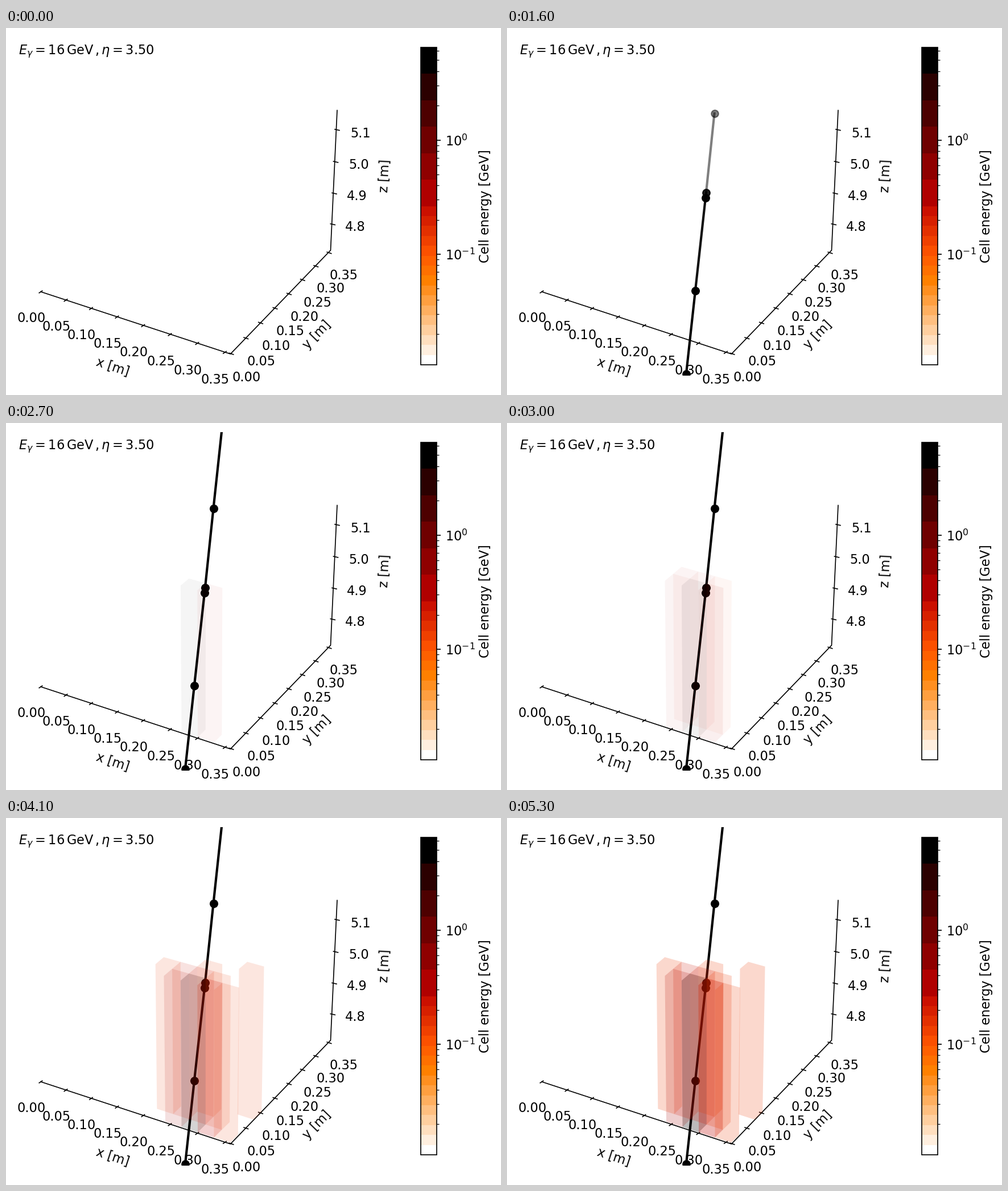
Animation of 870x644 px, one loop 6.3 s. Source, as a matplotlib script:

```python
import matplotlib.pyplot as plt
import numpy as np
from matplotlib.animation import FuncAnimation
from matplotlib.patches import Polygon, Rectangle

W, H, DPI = 870, 644, 64
STEP, FRAMES = 100, 63
PT = 72 / DPI  # points per pixel
FONT = 22.5 * PT
THIN = 1.67 * PT

plt.rcParams["font.family"] = "DejaVu Sans"
plt.rcParams["mathtext.fontset"] = "dejavusans"

fig = plt.figure(figsize=(W / DPI, H / DPI), dpi=DPI, facecolor="white")
ax = fig.add_axes([0, 0, 1, 1])
ax.set_xlim(0, W)
ax.set_ylim(H, 0)
ax.axis("off")


def stroke(x, y, width=THIN, **kw):
    return ax.plot(x, y, color="black", lw=width, **kw)[0]


def label(x, y, text, **kw):
    kw = {"ha": "center", "va": "baseline", "fontsize": FONT, **kw}
    ax.text(x, y, text, **kw)


def tick_axis(ticks, texts, values, half, fmt):
    """Ticks as short strokes, each with its number centred on a point."""
    dx, dy = half
    for (x, y), (tx, ty), v in zip(ticks, texts, values):
        stroke([x - dx, x + dx], [y - dy, y + dy], solid_capstyle="butt")
        label(tx, ty + 8.2, format(v, fmt))


def draw_axes():
    stroke([61, 394.5, 570.5, 582], [462.8, 572, 390, 144.5])
    steps = np.arange(8) * 0.05
    tick_axis(
        [(61, 463), (105, 477.7), (149.5, 492.3), (195, 507.2),
         (241, 522.3), (288, 538), (336, 553.5), (384.5, 569.3)],
        [(44.5, 507.5), (88.5, 522.5), (133, 538), (179, 552.5),
         (225, 568), (272.5, 583.5), (320, 599.5), (368, 616)],
        steps, (3.4, -2.3), ".2f")
    tick_axis(
        [(396, 571.7), (421.8, 544.3), (447.5, 517.6), (473, 491.8),
         (497.5, 466.7), (521.3, 442), (544.8, 418), (568, 394.5)],
        [(423, 612), (449, 584), (475, 557), (499.5, 530.8),
         (524.5, 505.5), (548, 480.3), (571, 455.8), (593.5, 432.3)],
        steps, (4.5, 1.5), ".2f")
    tick_axis(
        [(574.3, 344.5), (577, 290.3), (579.5, 235), (582, 178.7)],
        [(614, 348.2), (616.8, 293.7), (619.8, 239), (622.8, 183.5)],
        4.8 + np.arange(4) * 0.1, (4.8, 1.1), ".1f")
    for x, y, name, angle in [(187, 595, "x", -18.1), (547, 539, "y", 45.9),
                              (666, 259, "z", 87.3)]:
        label(x, y, f"{name} [m]", rotation=angle, va="center",
              rotation_mode="anchor")


def draw_colorbar(left=728.5, right=757, top=34, bottom=591):
    def band(y0, y1, color):
        ax.add_patch(Rectangle((left, y0), right - left, y1 - y0, lw=0,
                               color=color, antialiased=False))

    middle = (top + bottom) / 2
    fine, coarse = (bottom - middle) / 16, (middle - top) / 6
    for k in range(16):
        x = 1 - k / 32
        heat = np.clip([1.5 * x, 2 * x - 1, 4 * x - 3], 0, 1)
        band(bottom - (k + 1) * fine, bottom - k * fine, heat)
    for k, red in enumerate([0, 43, 77, 111, 143, 176]):
        band(top + k * coarse, top + (k + 1) * coarse, (red / 255, 0, 0))
    ax.add_patch(Rectangle((left, top), right - left, bottom - top,
                           fill=False, lw=THIN))

    for power in (-2, -1, 0):
        for m in range(1, 10):
            y = 196.5 - 200.5 * (power + np.log10(m))
            if not top < y < bottom:
                continue
            size = 7.3 if m == 1 else 4.2
            stroke([right, right + size], [y, y],
                   THIN if m == 1 else THIN * 0.75, solid_capstyle="butt")
            if m == 1:
                label(right + 14.6, y, f"$10^{{{power}}}$", ha="left",
                      va="center_baseline")
    label(842.5, 313, "Cell energy [GeV]", rotation=90, va="center",
          rotation_mode="anchor")


def prism(i, j):
    """Outline of one calorimeter cell on a skewed grid."""
    def top(u, v):
        return 277.5 + 29.4 * u + 14.6 * v, 277 + 8.2 * u - 12.3 * v

    def base(u, v):
        return 280 + 28.5 * u + 13.8 * v, 533 + 9.2 * u - 13.5 * v

    return [top(i, j), top(i, j + 1), top(i + 1, j + 1),
            base(i + 1, j + 1), base(i + 1, j), base(i, j)]


draw_axes()
draw_colorbar()
label(21.5, 46, r"$E_{\gamma} = 16\,\mathrm{GeV}\,, \eta = 3.50$", ha="left")

# Particle path: points, and the time at which each leg is first drawn.
PATH = [(315, 606.5), (331, 460.5), (349, 297.5), (350, 288.5),
        (364.5, 150), (381.5, -8)]
LEG_START = [1000, 1300, 1500, 1600, 1800]
window = Rectangle((0, 608.5), 700, -592.5, transform=ax.transData)
legs = []
for p, q in zip(PATH, PATH[1:]):
    leg = stroke([p[0], q[0]], [p[1], q[1]], 4.17 * PT, marker="o",
                 ms=12.5 * PT, mew=2.1 * PT, zorder=4)
    leg.set_clip_path(window)
    legs.append(leg)

# Cells: grid place, colour, final opacity, first time shown.
ORANGE, RED, DARK = (235, 56, 0), (205, 20, 0), (165, 0, 0)
CELLS = [
    (1, 0, (8, 2, 4), 0.27, 2700),
    (2, 0, (190, 5, 0), 0.29, 2700),
    (0, 0, DARK, 0.19, 2900),
    (0, 1, RED, 0.19, 2900),
    (1, 1, RED, 0.20, 2800),
    (2, 1, ORANGE, 0.20, 3000),
    (3, 0, ORANGE, 0.196, 3100),
    (1, 2, ORANGE, 0.196, 3200),
    (-1, 1, ORANGE, 0.196, 3400),
    (3, 3, ORANGE, 0.196, 3400),
]
cells = [ax.add_patch(Polygon(prism(i, j), facecolor=np.array(rgb) / 255,
                              lw=0, zorder=5))
         for i, j, rgb, _, _ in CELLS]


def update(frame):
    t = frame * STEP
    for leg, start in zip(legs, LEG_START):
        layers = max(0, (t - start) // STEP + 1)
        leg.set_alpha(1 - 0.5 ** layers if layers < 8 else 1)
        leg.set_visible(layers > 0)
    growth = np.interp(t, [2700, 3000, 3600, 4100, 5300],
                       [0.15, 0.22, 0.45, 0.64, 1])
    for cell, (*_, opacity, start) in zip(cells, CELLS):
        cell.set_alpha(opacity * growth)
        cell.set_visible(t >= start)
    return legs + cells


anim = FuncAnimation(fig, update, frames=FRAMES, interval=STEP,
                     init_func=lambda: update(0), repeat=True, repeat_delay=0)
plt.show()
```
